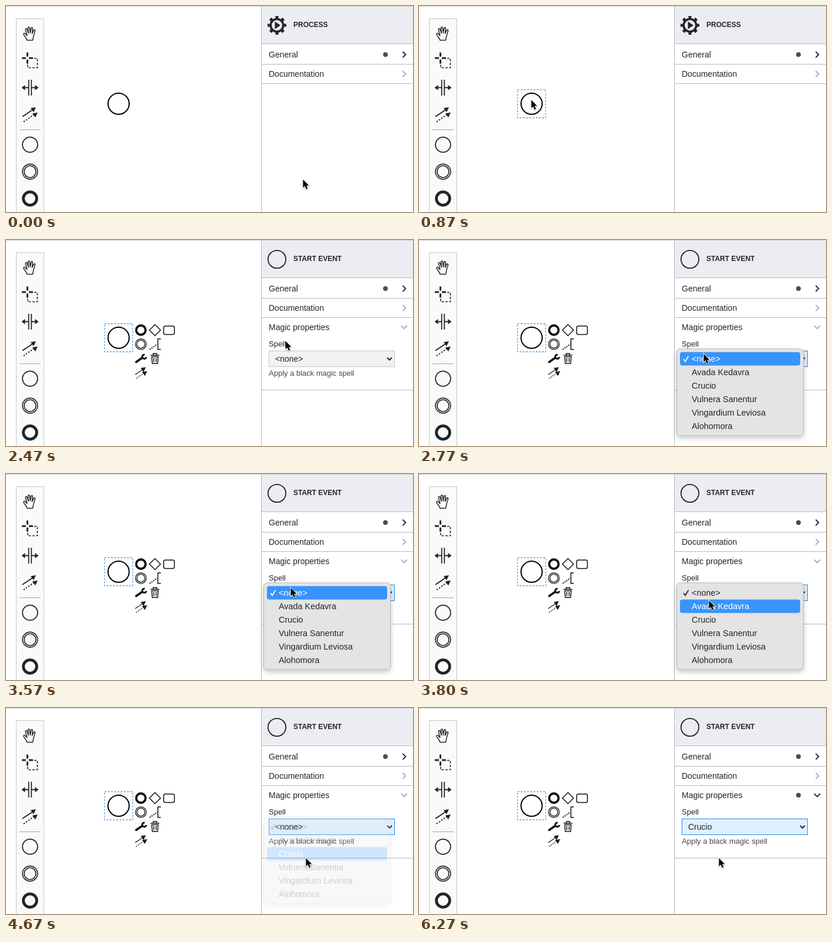
Recreate the animation shown at these times as an HTML page. Size 694x352 px, loop 6.93 s.

```html
<!DOCTYPE html>
<html lang="en">
<head>
<meta charset="utf-8">
<style>
  html, body { margin: 0; width: 100%; height: 100%; overflow: hidden; background: #fff; }
  svg { display: block; width: 694px; height: 352px; font: 14px "Liberation Sans", Arial, sans-serif; }
  text { fill: #22242a; }
  .heading { font-size: 12px; font-weight: bold; }
  .small { font-size: 13px; }
  .line { fill: none; stroke: #22242a; stroke-width: 1.8; }
  .rule { fill: none; stroke: #b5b6c4; }
  .soft { stroke: #a9abb3; }
  .dot { fill: #4a4b5c; }
  #select { fill: #f2f3f1; stroke: #c3c4cb; }
  #select.focused { fill: #e0f0fe; stroke: #1a8cf0; }
  #menu text { font-size: 14.4px; }
  #menu text.active { fill: #fff; }
  #menu .line.active { stroke: #fff; }
</style>
</head>
<body>
<svg viewBox="0 0 694 352">
  <defs>
    <g id="connect">
      <path d="M-13 4L5-8M-11 13l2-1.5m2-1.4l2-1.4m2-1.4l2-1.4m2-1.4l2-1.4m2-1.4l2-1.4" fill="none" stroke="#222" stroke-width="2"/>
      <path d="M10-12L1-10.500L6-3.500zM13-3L4-1.500L9 5.500z" fill="#222"/>
    </g>
    <filter id="shadow" x="-15%" y="-15%" width="130%" height="135%">
      <feDropShadow dx="0" dy="4" stdDeviation="4" flood-opacity=".22"/>
    </filter>
    <filter id="cursorShadow" x="-50%" y="-50%" width="200%" height="200%">
      <feDropShadow dx="0" dy="1" stdDeviation=".8" flood-opacity=".35"/>
    </filter>
  </defs>

  <!-- Tool palette -->
  <rect x="17.500" y="21.500" width="47" height="360" fill="#fafafa" stroke="#c8c8c8"/>
  <path class="line" style="stroke-width:1.5;stroke-linejoin:round" d="M36 58.500c-1-4-4-6-6-10c-.8-1.8 1.400-2.800 2.800-1.300l3 3.200l-2.500-10c-.5-2 2-2.600 2.600-.8l2.300 7l-.6-9c0-2 2.600-2 2.800 0l.9 8.600l1.500-8.200c.4-1.800 2.800-1.400 2.600.4l-.9 8.600l2.600-5.400c.8-1.700 3-.8 2.500.8l-2.400 8c-.6 2.500-.9 5-1.800 8.100z"/>
  <path class="line" style="stroke-width:3" d="M27 89h7m5 0h7M36.500 79.500v7m0 5v7"/>
  <path class="line" style="stroke-width:1.600" stroke-dasharray="4 2.500" d="M48 89.500h5.500v16H37v-7"/>
  <path class="line" d="M38.700 126v27M43.300 126v27M30 139.500h8M44 139.500h8"/>
  <path fill="#22242a" d="M26.500 139.500l6-4.500v9zM55.500 139.500l-6-4.500v9z"/>
  <use href="#connect" x="41" y="185"/>
  <path d="M23 211.500h36" stroke="#a0a0a0"/>
  <circle class="line" cx="41" cy="237" r="12.900"/>
  <circle class="line" cx="41" cy="283" r="12.900" style="stroke-width:1.600"/>
  <circle class="line" cx="41" cy="283" r="10" style="stroke-width:1.600"/>
  <circle class="line" cx="41" cy="329" r="11.400" style="stroke-width:4.800"/>

  <!-- Diagram -->
  <circle cx="192" cy="167" r="18" fill="#fff" stroke="#000" stroke-width="2"/>
  <rect id="outline" x="168" y="143" width="48" height="48" fill="none" stroke="#4c9be8" stroke-width="1.300" stroke-dasharray="3 2.500"/>
  <g id="pad" fill="none" stroke="#111" stroke-width="1.500">
    <circle cx="230" cy="154" r="8" stroke-width="3.800"/>
    <path d="M254 144.500l9.500 9.500l-9.500 9.500l-9.500-9.500z"/>
    <rect x="268.800" y="147" width="18.400" height="14.500" rx="3"/>
    <circle cx="230" cy="178" r="9.200" stroke-width="1.300"/>
    <circle cx="230" cy="178" r="6.800" stroke-width="1.300"/>
    <path d="M264 169h-5v18h5"/>
    <path d="M245 187l13-9" stroke-width="2" stroke-dasharray="2 1.800"/>
    <path d="M222 208.500l10-7" stroke-width="3.800" stroke-linecap="round"/>
    <path d="M236.500 196a3.500 3.500 0 1 0 2.800 4" stroke-width="3"/>
    <path d="M246.500 197h15M251 196.500v-2.500h6v2.500M248.500 199.500l1 11.500h9l1-11.500zM252 201.500v7M256 201.500v7"/>
    <use href="#connect" transform="translate(230 227) scale(.75)"/>
  </g>

  <!-- Properties panel -->
  <rect x="436" y="0" width="258" height="352" fill="#fff"/>
  <rect x="436" y="0" width="258" height="64" fill="#ecedf2"/>
  <path class="rule" d="M435.500 0v352M436 64.500h258M436 99.500h258M436 132.500h258"/>
  <path d="M0 .5h694" stroke="#d0d0d3"/>
  <g id="process">
    <circle class="line" cx="462" cy="33" r="10.800" style="stroke-width:3.600"/>
    <circle class="line" cx="462" cy="33" r="14" pathLength="8" stroke-dasharray=".46 .54" stroke-dashoffset=".23" style="stroke-width:4"/>
    <path d="M458.500 26.500l9.500 6.500l-9.500 6.500z" fill="#22242a"/>
    <text class="heading" x="490" y="36">PROCESS</text>
  </g>
  <g id="startEvent">
    <circle class="line" cx="462" cy="33" r="15.200"/>
    <text class="heading" x="490" y="36">START EVENT</text>
    <text x="448" y="154">Magic properties</text>
  </g>
  <text x="448" y="88">General</text>
  <circle class="dot" cx="647" cy="83" r="4"/>
  <path class="line" d="M676.500 78l5 5l-5 5"/>
  <text x="448" y="121">Documentation</text>
  <path class="line soft" d="M676.500 111l5 5l-5 5"/>
  <g id="collapsed">
    <path class="line soft" d="M676.500 144l5 5l-5 5"/>
    <path class="rule" d="M436 165.500h258"/>
  </g>
  <g id="expanded">
    <circle id="changedDot" class="dot" cx="647" cy="149" r="4"/>
    <path id="chevron" class="line" d="M674 146.500l5 5l5-5"/>
    <text class="small" x="448" y="182">Spell</text>
    <rect id="select" x="448.500" y="189.500" width="214" height="27"/>
    <text id="value" x="459" y="208"></text>
    <path class="line" style="stroke-width:2" d="M650 201l4 4l4-4"/>
    <text class="small" x="448" y="232" style="fill:#45474f">Apply a black magic spell</text>
    <path class="rule" d="M436 256.500h258"/>
  </g>

  <g id="menu">
    <rect x="439.500" y="186" width="216" height="148" rx="6" fill="#e4e4e4" stroke="#b9b9b9" filter="url(#shadow)"/>
    <rect id="highlight" x="445" width="205" height="23" rx="4" fill="#3894fc"/>
    <path id="check" class="line" d="M451 203.500l3 4l5.500-9"/>
  </g>

  <path id="cursor" filter="url(#cursorShadow)" d="M.5.5v14l3.100-2.900l2.400 5.300l2.500-1.100l-2.400-5.100h4.400z" fill="#000" stroke="#fff" stroke-width="1.800" paint-order="stroke"/>
</svg>
<script>
const LOOP = 6930, ROW = 23, MENU_TOP = 191.5;
const spells = ['<none>', 'Avada Kedavra', 'Crucio', 'Vulnera Sanentur', 'Vingardium Leviosa', 'Alohomora'];
// time, x, y of the pointer tip
const pointerPath = [
  [30, 506, 296], [270, 224, 222], [400, 224, 222], [500, 224, 186], [830, 224, 186],
  [870, 191, 160], [1370, 191, 160], [1500, 240, 184], [1670, 377, 170], [2000, 458, 149],
  [2300, 458, 149], [2470, 476, 172], [2700, 485, 194], [3570, 485, 194], [4230, 511, 256]
];
const el = id => document.getElementById(id);
const show = (id, on) => { el(id).style.display = on ? '' : 'none'; };

const items = spells.map((name, i) => {
  const item = document.createElementNS('http://www.w3.org/2000/svg', 'text');
  item.textContent = name;
  item.setAttribute('x', 465);
  item.setAttribute('y', 208 + i * ROW);
  return el('menu').appendChild(item);
});

function pointerAt(t) {
  const next = pointerPath.findIndex(p => p[0] > t);
  if (next === 0) return pointerPath[0].slice(1);
  if (next < 0) return pointerPath.at(-1).slice(1);
  const [t0, x0, y0] = pointerPath[next - 1], [t1, x1, y1] = pointerPath[next];
  const k = (t - t0) / (t1 - t0);
  return [x0 + (x1 - x0) * k, y0 + (y1 - y0) * k];
}

function draw(t) {
  const [x, y] = pointerAt(t);
  el('cursor').setAttribute('transform', `translate(${x} ${y})`);

  const selected = t >= 1070, expanded = t >= 2200, chosen = t >= 4790;
  show('outline', t >= 430);
  show('pad', selected);
  show('process', !selected);
  show('startEvent', selected);
  show('collapsed', selected && !expanded);
  show('expanded', expanded);
  show('changedDot', chosen);
  el('chevron').classList.toggle('soft', !chosen);
  el('select').classList.toggle('focused', t >= 2730);
  el('value').textContent = chosen ? 'Crucio' : '<none>';

  // The picked row blinks once before the menu fades
  const blink = t >= 4400 && t < 4470;
  const active = blink ? -1 : Math.max(0, Math.floor((y - MENU_TOP) / ROW));
  show('menu', t >= 2730 && t < 4730);
  el('menu').style.opacity = Math.min(1, Math.max(0, (4720 - t) / 220));
  show('highlight', !blink);
  el('highlight').setAttribute('y', MENU_TOP + active * ROW);
  el('check').classList.toggle('active', active === 0);
  items.forEach((item, i) => item.classList.toggle('active', i === active));
}

function frame() {
  draw(performance.now() % LOOP);
  requestAnimationFrame(frame);
}
frame();
</script>
</body>
</html>
```
